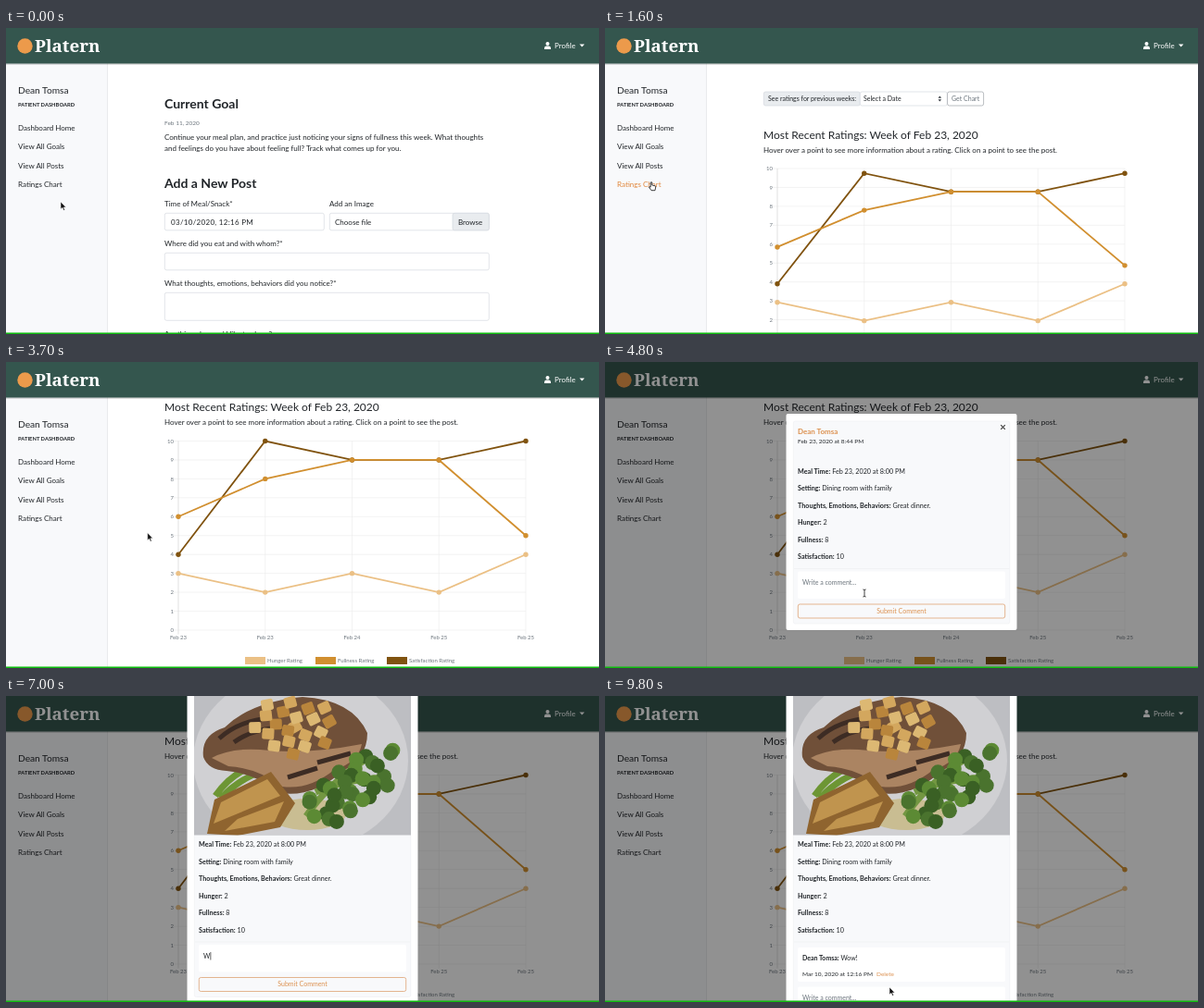
An HTML page for the animation above (9.9 s loop, 640 by 331 pixels).

```html
<!DOCTYPE html>
<html lang="en">
<head>
<meta charset="utf-8">
<title>Meal dashboard</title>
<style>
  html, body { margin: 0; width: 100%; height: 100%; overflow: hidden; background: #fff; }
  svg { display: block; width: 100%; height: 100%; }
  text { font-family: Lato, sans-serif; fill: #212529; }
  .b { font-weight: 700; }
  .mut { fill: #6c757d; }
  .org { fill: #dc9150; }
  .wht { fill: #fff; }
  .brand { font-family: "Noto Serif", serif; font-weight: 900; }
  .field { fill: #fff; stroke: #ced4da; stroke-width: .6; }
  .addon { fill: #e9ecef; stroke: #ced4da; stroke-width: .6; }
</style>
</head>
<body>
<svg id="stage" viewBox="0 0 640 331"></svg>
<script>
const LOOP = 9900, USER = "Dean Tomsa";
const $ = id => document.getElementById(id);

// Text placed by its left edge and the middle of its capitals
const text = (x, mid, str, size = 8, cls = "", extra = "") =>
  `<text x="${x}" y="${mid + size * .35}" font-size="${size}" class="${cls}" ${extra}>${str}</text>`;
const box = (x, y, w, h, cls = "field", extra = "") =>
  `<rect x="${x}" y="${y}" width="${w}" height="${h}" rx="2" class="${cls}" ${extra}/>`;
const group = (id, body, extra = "") => `<g id="${id}" ${extra}>${body}</g>`;
const path = (d, fill, extra = "") => `<path d="${d}" fill="${fill}" ${extra}/>`;

// ---- chart ----
const BASE = 356.5, STEP = 20.45;
const chartX = i => 186 + i * 93.75;
const chartY = v => BASE - v * STEP;
const series = [
  { name: "Satisfaction Rating", color: "#80530f", data: [4, 10, 9, 9, 10], key: 411 },
  { name: "Fullness Rating", color: "#d18f2f", data: [6, 8, 9, 9, 5], key: 334 },
  { name: "Hunger Rating", color: "#ebc085", data: [3, 2, 3, 2, 4], key: 258 }
];

function grid() {
  let s = "";
  for (let v = 0; v <= 10; v++) {
    s += path(`M181 ${chartY(v)}H561`, "none", 'stroke="#ebebeb" stroke-width=".6"')
       + text(181, chartY(v), v, 6, "mut", 'text-anchor="end"');
  }
  ["Feb 23", "Feb 23", "Feb 24", "Feb 25", "Feb 25"].forEach((day, i) => {
    s += path(`M${chartX(i)} 152V361`, "none", `stroke="${i ? "#ebebeb" : "#cfcfcf"}" stroke-width=".6"`)
       + text(chartX(i), 364.5, day, 6, "mut", 'text-anchor="middle"');
  });
  for (const { name, color, key } of series)
    s += `<rect x="${key}" y="385.5" width="22" height="8" fill="${color}"/>` + text(key + 24, 389.5, name, 6, "mut");
  return s;
}

function plot(grow) {
  return series.map(({ color, data }) => {
    const pts = data.map((v, i) => [chartX(i), chartY(v * grow)]);
    return `<polyline points="${pts.join(" ")}" fill="none" stroke="${color}" stroke-width="1.8"/>`
      + pts.map(([x, y]) => `<circle cx="${x}" cy="${y}" r="2.7" fill="${color}"/>`).join("");
  }).join("");
}

// ---- page parts ----
const header = `
  <rect y="38" width="640" height="2" fill="#000" opacity=".13"/>
  <rect width="640" height="38.5" fill="#34564e"/>
  <circle cx="20.5" cy="19.5" r="8.2" fill="#ec9a4b"/>`
  + text(31, 19.5, "Platern", 18.8, "wht brand") + text(592, 19, "Profile", 8, "wht")
  + path("M619 17.5h5.4l-2.7 3z", "#fff")
  + `<circle cx="584.5" cy="17" r="2" fill="#fff"/>` + path("M581 23v-1.2q0-2.4 2.4-2.4h2.2q2.4 0 2.4 2.4V23z", "#fff");

const sidebar = `<rect width="109.5" height="331" fill="#f8f9fb"/>
  <path d="M109.5 0V331" stroke="#e2e4e6" stroke-width=".7"/>`
  + text(13, 67.2, USER, 10.2) + text(13, 83.3, "PATIENT DASHBOARD", 5.8, "b")
  + ["Dashboard Home", "View All Goals", "View All Posts", "Ratings Chart"]
    .map((s, i) => text(13, 108.3 + 20.2 * i, s, 8, "", `id="link${i}"`)).join("");

const home = text(171, 82.5, "Current Goal", 14, "b") + text(171, 103, "Feb 11, 2020", 6.5, "mut")
  + text(171, 118, "Continue your meal plan, and practice just noticing your signs of fullness this week. What thoughts")
  + text(171, 130, "and feelings do you have about feeling full? Track what comes up for you.")
  + text(171, 168.5, "Add a New Post", 14, "b")
  + text(171, 190, "Time of Meal/Snack*") + text(349, 190, "Add an Image")
  + box(171.3, 200.3, 172, 18.5) + text(178, 209.7, "03/10/2020, 12:16 PM", 8, "", 'letter-spacing=".3"')
  + box(349.3, 200.3, 172, 18.5) + box(482, 200.3, 39.3, 18.5, "addon")
  + text(355, 209.7, "Choose file") + text(488, 209.7, "Browse")
  + text(171, 233, "Where did you eat and with whom?*") + box(171.3, 243.3, 350, 18.5)
  + text(171, 276, "What thoughts, emotions, behaviors did you notice?*") + box(171.3, 286.3, 350, 30)
  + text(171, 331, "Anything else you'd like to share?");

const ratings = box(171.3, 69, 104, 15, "addon") + text(176, 76.5, "See ratings for previous weeks:", 7)
  + box(275.3, 69, 94, 15) + text(279, 76.5, "Select a Date", 7)
  + path("M359.5 75.8l1.8-2.4 1.8 2.4zm0 1.4l1.8 2.4 1.8-2.4z", "#343a40")
  + box(369.6, 69, 39, 15, "field", 'style="stroke:#8b9299"') + text(374, 76.5, "Get Chart", 7, "mut")
  + text(171, 115.5, "Most Recent Ratings: Week of Feb 23, 2020", 12)
  + text(171, 132, "Hover over a point to see more information about a rating. Click on a point to see the post.")
  + grid() + group("lines", "");

// ---- meal picture: simple tonal shapes ----
function meal() {
  let s = `<rect x="203" y="-25" width="234" height="176" fill="#bdbec2"/>
    <ellipse cx="318" cy="70" rx="116" ry="98" fill="#d0d0d3"/>
    <ellipse cx="325" cy="128" rx="42" ry="17" fill="#c9bd92"/>`;
  s += path("M226 108Q244 82 272 74M232 111Q250 90 280 80", "none", 'stroke="#6d9634" stroke-width="7"');
  s += path("M213 66Q210 42 236 34Q265 6 320 1Q374 4 390 40Q390 68 362 82Q332 110 296 105Q270 84 238 81Q218 80 213 66z", "#705039");
  s += path("M222 67Q242 56 274 58Q322 64 384 52Q380 72 354 80Q327 102 298 98Q272 78 240 76z", "#ab8462");
  s += path("M230 46Q252 26 286 24M246 50Q268 34 300 34M336 72L372 62M304 88L336 78", "none", 'stroke="#3d2c24" stroke-width="5"');
  s += path("M217 149L225 112L286 82L312 116L296 142L250 151z", "#8f642f");
  s += path("M224 138L232 115L282 90L296 108zM236 146L250 133L300 114L290 136z", "#c0944e");
  // heads and stalks of the greens
  s += path("M324 130Q345 98 386 70M334 104Q360 92 406 88", "none", 'stroke="#739742" stroke-width="7"');
  for (let i = 0; i < 34; i++) {
    const u = i / 33, a = i * 2.4;
    s += `<circle cx="${408 - 70 * u + 17 * Math.sin(a)}" cy="${72 + 54 * u + 15 * Math.cos(a * 1.3)}" r="8" fill="${["#4a732e", "#5c8a34", "#3a6024"][i % 3]}"/>`;
  }
  for (let i = 0; i < 21; i++) {
    const a = i * 2.4, r = 10.5 * Math.sqrt(i), x = 312 + r * Math.cos(a), y = 33 + r * .65 * Math.sin(a);
    s += `<rect x="${x - 6.5}" y="${y - 6}" width="13" height="12" rx="2" fill="${["#d3a75e", "#b9853c", "#dcb873"][i % 3]}" transform="rotate(${i * 37 % 60 - 30} ${x} ${y})"/>`;
  }
  return s;
}

// ---- modal, laid out with its top edge at zero ----
const detail = (i, label, value) =>
  text(208, 62 + 18.5 * i, `<tspan class="b">${label}:</tspan> ${value}`, 7.2);

const modal = `<rect id="sheet" x="195.5" width="249" rx="2" fill="#fff"/>
  <rect id="card" x="203.3" y="8" width="233.5" rx="2" fill="#f8f9fb" stroke="#eeeff1" stroke-width=".6"/>`
  + text(208, 19.5, USER, 8, "b org") + text(208, 30, "Feb 23, 2020 at 8:44 PM", 6.5)
  + path("M427.2 12.2l4.6 4.6m0-4.6l-4.6 4.6", "none", 'stroke="#444" stroke-width="1.2"')
  + group("photo", group("food", meal(), 'transform="translate(0 64.5)"'), 'clip-path="url(#frame)"')
  + group("details",
      detail(0, "Meal Time", "Feb 23, 2020 at 8:00 PM") + detail(1, "Setting", "Dining room with family")
      + detail(2, "Thoughts, Emotions, Behaviors", "Great dinner.") + detail(3, "Hunger", 2)
      + detail(4, "Fullness", 8) + detail(5, "Satisfaction", 10)
      + path("M204 167.5H436.5", "none", 'stroke="#eceef0" stroke-width=".6"')
      + group("comment", box(208, 173.5, 224, 37, "wht")
        + text(213, 185.5, `<tspan class="b">${USER}:</tspan> Wow!`, 7)
        + text(213, 202.5, "Mar 10, 2020 at 12:16 PM", 6.5) + text(293, 202.5, "Delete", 6.5, "org"))
      + group("form", box(208, 170.5, 224, 29.5, "wht") + text(213, 183, "", 7, "", 'id="entry"')
        + `<path id="caret" d="M0 178.5v8.5" stroke="#222" stroke-width=".7"/>`
        + box(208.3, 206, 223.4, 15, "", 'fill="#f8f9fb" stroke="#dfa274" stroke-width=".8"')
        + text(320, 213.5, "Submit Comment", 7, "org", 'text-anchor="middle"')));

const cursors = {
  arrow: path("M0 0v8l1.9-1.7 1.3 3 1.3-.6-1.3-2.8h2.5z", "#111", 'stroke="#fff" stroke-width=".5"'),
  hand: path("M-.8 0q.8-.9 1.6 0v3l3.3.8q.8.3.6 1.2l-.7 3.7H0L-2.6 5q.2-1 1.8.2z", "#fff", 'stroke="#111" stroke-width=".8"'),
  beam: path("M-1.6-4Q0-4 0-3Q0-4 1.6-4M0-3V3M-1.6 4Q0 4 0 3Q0 4 1.6 4", "none", 'stroke="#111" stroke-width=".8"')
};

$("stage").innerHTML = `<clipPath id="frame"><rect x="203" y="40" width="234" height="175"/></clipPath>
  <rect width="640" height="331" fill="#fff"/>`
  + group("home", home) + group("ratings", ratings) + sidebar + header
  + `<rect id="shade" width="640" height="331"/>`
  + `<rect id="thumb" x="635" y="48" width="4" height="283" rx="2" fill="#333"/>`
  + group("modal", modal)
  + Object.entries(cursors).map(([id, d]) => group(id, d)).join("")
  + `<rect y="329.5" width="640" height="1.5" fill="#0fbe0f"/>`;

// ---- motion ----
const clamp = v => Math.max(0, Math.min(1, v));
const span = (t, a, b) => clamp((t - a) / (b - a));
const smooth = u => u * u * (3 - 2 * u);
const easeOut = (u, p = 3) => 1 - (1 - u) ** p;
const show = (id, on) => $(id).setAttribute("visibility", on ? "inherit" : "hidden");
const set = (id, name, v) => $(id).setAttribute(name, v);
const move = (id, x, y) => set(id, "transform", `translate(${x} ${y})`);

const trail = [[100, 59, 188], [400, 49, 167], [700, 49, 167], [800, 50, 167], [2000, 50, 167],
  [2600, 147, 182], [3600, 147, 182], [4400, 280, 248], [4700, 280, 250], [5900, 280, 250],
  [6500, 280, 283], [7800, 280, 283], [8500, 307, 315]];

function pointer(t) {
  const i = trail.findIndex(k => k[0] > t);
  if (i === 0) return trail[0].slice(1);
  if (i < 0) return trail[trail.length - 1].slice(1);
  const [a, b] = [trail[i - 1], trail[i]], u = smooth(span(t, a[0], b[0]));
  return [a[1] + (b[1] - a[1]) * u, a[2] + (b[2] - a[2]) * u];
}

function cursorKind(t) {
  if (t < 300) return "arrow";
  if (t < 2100) return "hand";
  if (t < 4700) return "arrow";
  if (t < 6900) return "beam";
  if (t < 7800) return "";
  if (t < 8300) return "beam";
  return t < 8700 ? "hand" : "arrow";
}

function drawModal(t) {
  const loaded = t >= 4900, posted = t >= 8700;
  const extra = loaded ? 163 : 0, added = posted ? 45.5 : 0;
  const scroll = 77 * easeOut(span(t, 5100, 5800)) + 1.5 * span(t, 5800, 6000);
  show("modal", t >= 4700);
  set("modal", "opacity", span(t, 4600, 4800));
  move("modal", 0, loaded ? 14 - scroll : 56 - 25 * (1 - easeOut(span(t, 4600, 4800))));
  set("sheet", "height", 234 + extra + added);
  set("card", "height", 219 + extra + added);
  show("photo", loaded);
  move("details", 0, extra);
  show("comment", posted);
  move("form", 0, added);

  const typed = posted ? "" : "Wow!".slice(0, [6900, 7200, 7400, 7600].filter(k => t >= k).length);
  const entry = $("entry");
  entry.textContent = typed || "Write a comment...";
  entry.setAttribute("class", typed ? "" : "mut");
  show("caret", typed && t < 8500);
  if (typed) move("caret", 213.6 + entry.getComputedTextLength(), 0);
}

function render(t) {
  const onChart = t >= 1000;
  show("home", !onChart);
  show("ratings", onChart);
  move("ratings", 0, -66.5 * smooth(span(t, 2900, 3500)));
  $("lines").innerHTML = plot(easeOut(span(t, 1000, 2000), 4));
  $("link3").style.fill = t >= 300 && t < 2100 ? "#e0863a" : "";

  set("shade", "opacity", .43 * span(t, 4600, 4750));
  set("thumb", "opacity", t < 5100 ? 0 : .65 * (1 - span(t, 6000, 6400)));
  drawModal(t);

  const kind = cursorKind(t), [x, y] = pointer(t);
  for (const id in cursors) {
    show(id, id === kind);
    move(id, x, y);
  }
}

const start = performance.now();
function tick() {
  const t = (performance.now() - start) % LOOP;
  render(Math.floor(t / 100) * 100);
  requestAnimationFrame(tick);
}
tick();
</script>
</body>
</html>
```
